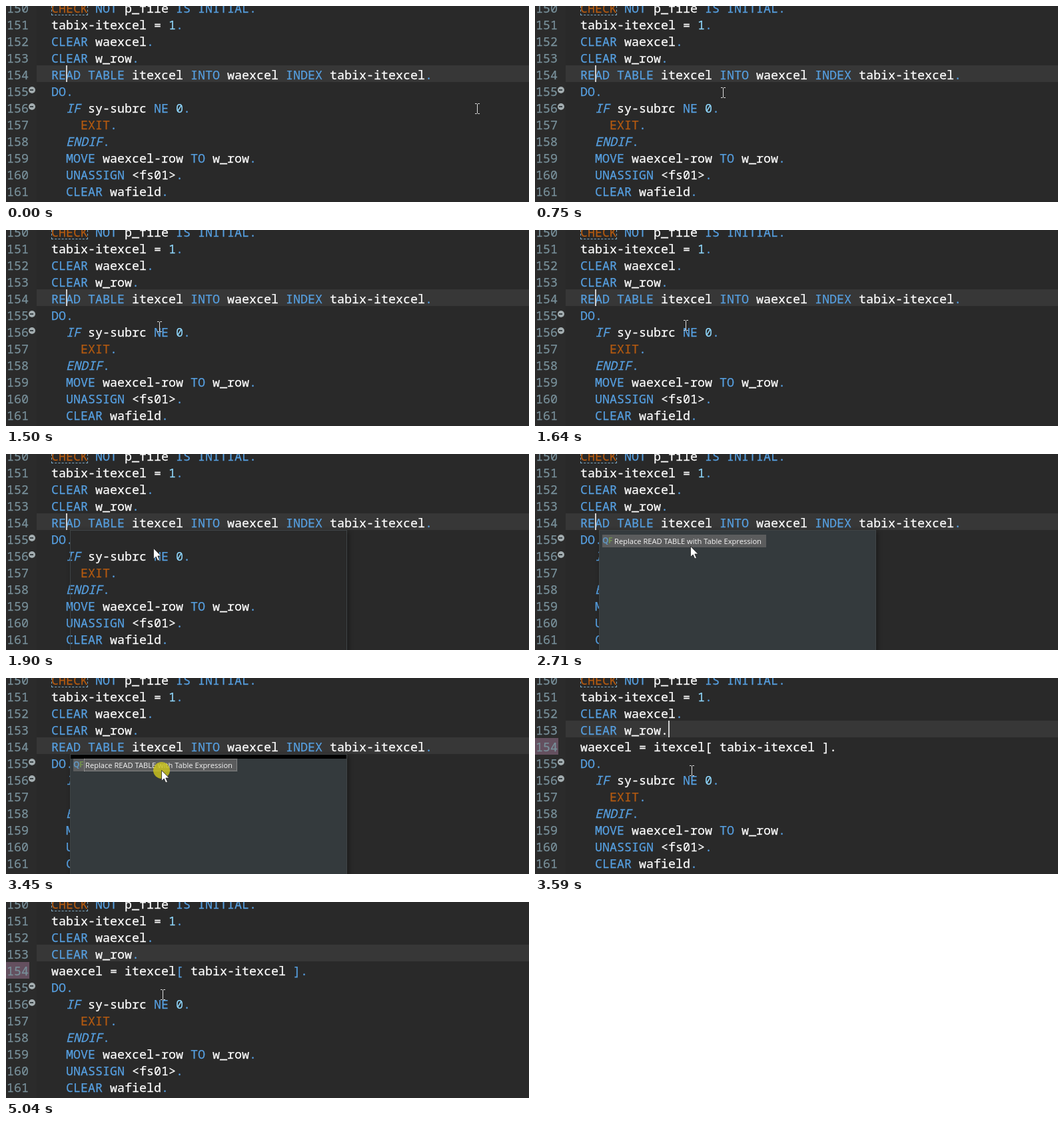
Recreate the animation shown at these times as an HTML page. Size 785x294 px, loop 5260 ms.

```html
<!DOCTYPE html>
<html lang="en">
<head>
<meta charset="utf-8">
<title>Editor quick fix</title>
<style>
html, body { margin: 0; width: 100%; height: 100%; overflow: hidden; background: #292929; }
#stage { position: relative; width: 785px; height: 294px; overflow: hidden; background: #292929; }
#stage div, #stage pre, #stage svg { position: absolute; margin: 0; box-sizing: border-box; }

/* every part shares one clock and changes in hard steps */
.t { animation: 5.26s step-end infinite; }

pre {
  top: -10px;
  font: 500 18.333px/25px "Noto Sans Mono", "DejaVu Sans Mono", monospace;
  -webkit-text-stroke: .25px;
  color: #fff;
}
#nums { left: 1px; color: #78909a; }
#code { left: 68px; }
.swap { left: 68px; top: 90px; }
b, i { font-weight: inherit; color: #569fe0; }
u { text-decoration: none; color: #b35a10; }
s { text-decoration: none; color: #8fd6fb; }

#gutter { left: 0; top: 0; width: 46px; height: 294px; background: #2b2b2b; }
#line { left: 46px; top: 89px; width: 739px; height: 25px; background: #373737; animation-name: line; }
#changed { left: 0; top: 90px; width: 35px; height: 25px; background: #64505f; animation-name: after; }
#mark { left: 68px; top: -11px; width: 55px; height: 25px; border: 1px dashed #7da9c4; }
#caret { left: 90px; top: 89px; width: 2px; height: 25px; background: #d0d0d0; animation-name: caret; }
.old { animation-name: before; }
.new { animation-name: after; }
.late { animation-name: late; }
.fold { left: 33.5px; width: 10px; height: 10px; border-radius: 50%; background: #a3adb0; }
.fold::after { content: ""; position: absolute; left: 2.5px; top: 4px; width: 5px; height: 2px; background: #3a4245; }

#popup {
  left: 96px; top: 114px; width: 416px; height: 200px;
  border: 1px solid #3f4446;
  box-shadow: 2px 2px 7px rgba(0, 0, 0, .4);
  animation-name: popup;
}
#panel { left: 0; top: 0; width: 414px; height: 198px; background: #343a3d; animation-name: panel; }
#bar { left: 0; top: 0; width: 414px; height: 6px; background: #000; animation-name: bar; }
#row { left: 4px; top: 6px; width: 246px; height: 19px; animation-name: row; }
#icon { left: 0; top: 0; font: 700 12px/18px "Noto Sans", sans-serif; letter-spacing: -.5px; color: #5f92ba; }
#icon span { color: #71904f; }
#focus { left: 16px; top: 0; width: 230px; height: 19px; background: #5b5c5d; border: 1px dotted #b0b0b0; animation-name: press; }
#label { left: 18px; top: 1px; font: 11.15px/18px "Open Sans", "Noto Sans", sans-serif; color: #f4f4f4; white-space: nowrap; }
#click { left: 220.5px; top: 125.5px; width: 25px; height: 25px; border-radius: 50%; background: rgba(204, 196, 28, .82); animation-name: press; }

#mouse { left: 0; top: 0; width: 0; height: 0; animation-name: move; }
#beam { left: -4px; top: -8px; animation-name: beam; }
#arrow { left: -1px; top: -1px; animation-name: arrow; }

@keyframes line { 0% { top: 89px } 68.25%, 100% { top: 64px } }
@keyframes before { 0% { opacity: 1 } 68.25%, 100% { opacity: 0 } }
@keyframes after { 0% { opacity: 0 } 68.25%, 100% { opacity: 1 } }
@keyframes late { 0% { color: #569fe0 } 68.25% { color: #fff } 85.74%, 100% { color: #569fe0 } }
@keyframes caret {
  0% { opacity: 1; transform: none }
  62.92% { opacity: 0; transform: none }
  68.25% { opacity: 1; transform: translate(110px, -25px) }
  95.81%, 100% { opacity: 0; transform: translate(110px, -25px) }
}
@keyframes popup { 0% { opacity: 0 } 34.6% { opacity: .5 } 36.12% { opacity: 1 } 66.92%, 100% { opacity: 0 } }
@keyframes panel { 0% { opacity: 0 } 38.02%, 100% { opacity: 1 } }
@keyframes bar { 0% { opacity: 0 } 65.58%, 100% { opacity: 1 } }
@keyframes row {
  0% { background: #4a4e50 }
  42.58% { background: #5b5c5d }
  46.38% { background: #4a4e50 }
  49.8%, 100% { background: #5b5c5d }
}
@keyframes press { 0% { opacity: 0 } 61.59% { opacity: 1 } 66.92%, 100% { opacity: 0 } }
@keyframes beam { 0% { opacity: 1 } 34.6% { opacity: 0 } 68.25%, 100% { opacity: 1 } }
@keyframes arrow { 0% { opacity: 0 } 34.6% { opacity: 1 } 68.25%, 100% { opacity: 0 } }
@keyframes move {
  0% { transform: translate(707px, 154px) }
  6.27% { transform: translate(700px, 157px) }
  7.6% { transform: translate(662px, 165px) }
  8.93% { transform: translate(590px, 171px) }
  10.26% { transform: translate(500px, 168px) }
  11.59% { transform: translate(410px, 158px) }
  12.92% { transform: translate(335px, 143px) }
  14.25% { transform: translate(282px, 130px) }
  15.58% { transform: translate(258px, 122px) }
  18.06% { transform: translate(257px, 126px) }
  19.58% { transform: translate(255px, 137px) }
  21.1% { transform: translate(252px, 150px) }
  22.62% { transform: translate(248px, 160px) }
  24.14% { transform: translate(243px, 164px) }
  25.66% { transform: translate(239px, 160px) }
  27.18% { transform: translate(236px, 153px) }
  28.51% { transform: translate(230px, 145px) }
  29.84% { transform: translate(226px, 143px) }
  31.36% { transform: translate(223px, 142px) }
  32.88% { transform: translate(221px, 141px) }
  42.58% { transform: translate(222px, 138px) }
  46.38% { transform: translate(225px, 140px) }
  48.09% { transform: translate(229px, 139px) }
  49.8% { transform: translate(232px, 138px) }
  51.52% { transform: translate(233px, 138px) }
  68.25%, 100% { transform: translate(235px, 139px) }
}
</style>
</head>
<body>
<div id="stage">
  <div id="gutter"></div>
  <div id="line" class="t"></div>
  <div id="changed" class="t"></div>
<pre id="nums">150
151
152
153
154
155
156
157
158
159
160
161</pre>
<pre id="code"><u>CHECK</u> <b>NOT</b> p_file <b>IS INITIAL.</b>
tabix-itexcel = <s>1</s><b>.</b>
<b>CLEAR</b> waexcel<b>.</b>
<b>CLEAR</b> w_row<b class="t late">.</b>

<b>DO.</b>
  <i>IF</i> sy-subrc <b>NE</b> <s>0</s><b>.</b>
    <u>EXIT</u><b>.</b>
  <i>ENDIF</i><b>.</b>
  <b>MOVE</b> waexcel-row <b>TO</b> w_row<b>.</b>
  <b>UNASSIGN</b> &lt;fs01&gt;<b>.</b>
  <b>CLEAR</b> wafield<b>.</b></pre>
<pre class="swap t old"><b>READ TABLE</b> itexcel <b>INTO</b> waexcel <b>INDEX</b> tabix-itexcel<b>.</b></pre>
<pre class="swap t new">waexcel = itexcel<b class="t late">[</b> tabix-itexcel <b class="t late">].</b></pre>
  <div id="mark"></div>
  <div class="fold" style="top:121px"></div>
  <div class="fold" style="top:146px"></div>
  <div id="caret" class="t"></div>

  <div id="popup" class="t">
    <div id="panel" class="t">
      <div id="bar" class="t"></div>
      <div id="row" class="t">
        <div id="icon">Q<span>F</span></div>
        <div id="focus" class="t"></div>
        <div id="label">Replace READ TABLE with Table Expression</div>
      </div>
    </div>
  </div>
  <div id="click" class="t"></div>

  <div id="mouse" class="t">
    <svg id="beam" class="t" width="8" height="16" fill="none" stroke="#dcdcdc">
      <path d="M1 .5H3.5L4.5 1.5L5.5 .5H8M4.5 1V15M1 15.5H3.5L4.5 14.5L5.5 15.5H8"/>
    </svg>
    <svg id="arrow" class="t" width="15" height="22">
      <path d="M1.5 1.5V17.5L5.2 14L7.8 20L10.4 18.9L7.8 13H12.8Z" fill="#fff" stroke="#222" stroke-width=".8"/>
    </svg>
  </div>
</div>
</body>
</html>
```
